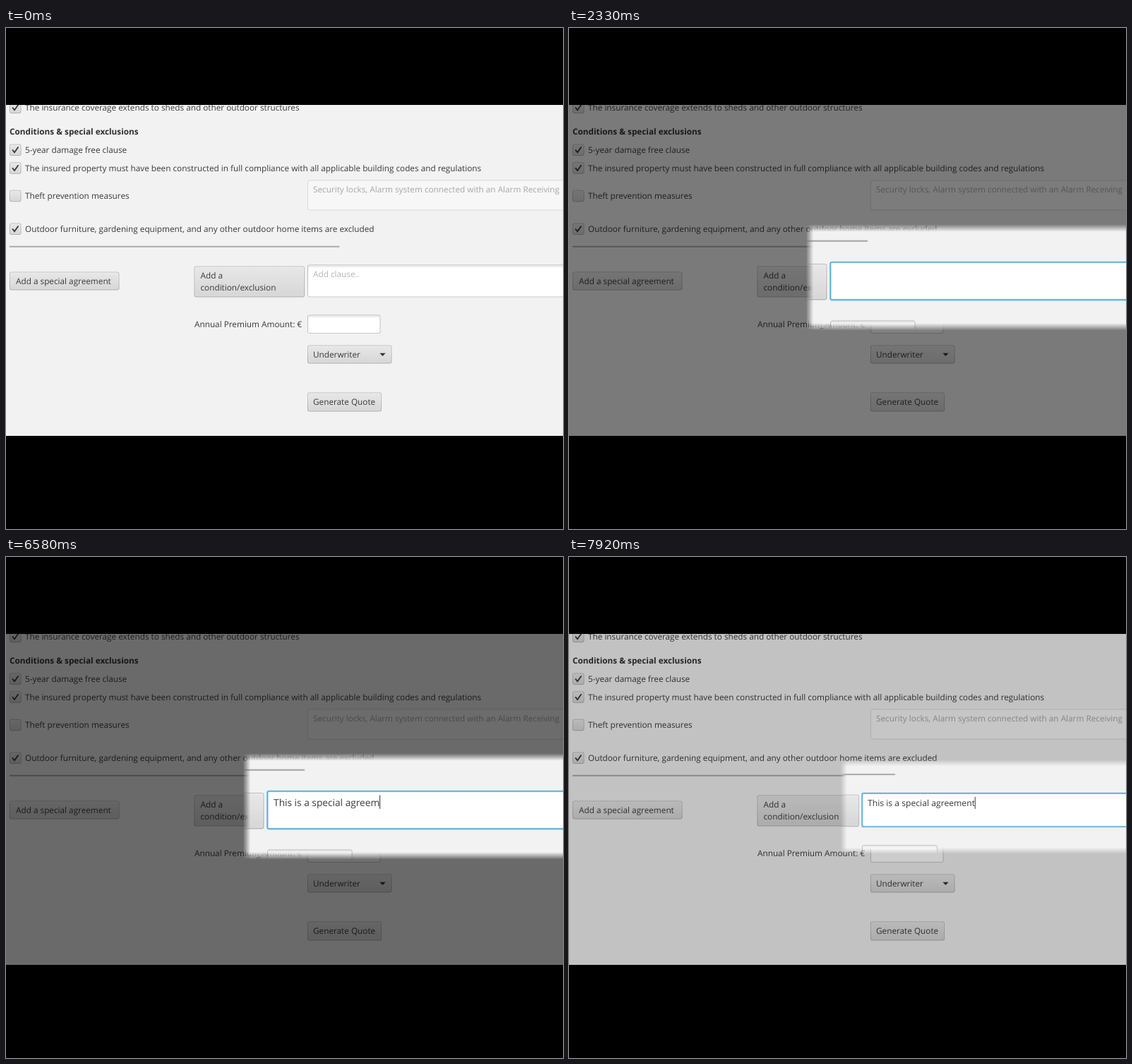
Animation, 789 px wide and 710 px high, one loop 8000 ms. Source, as an HTML page with a canvas:

```html
<!DOCTYPE html>
<html lang="en">
<head>
<meta charset="utf-8">
<title>Insurance quote form</title>
<style>
  html, body { margin: 0; width: 100%; height: 100%; overflow: hidden; background: #000; }
  canvas { display: block; }
</style>
</head>
<body>
<canvas id="stage" width="789" height="710"></canvas>
<script>
const W = 789, H = 710, LOOP = 8000, TICK = 1000 / 12;
const PANEL = { top: 109, bottom: 578 };
const PIVOT = { x: 772, y: 358 }, ZOOM = 0.165, DIM = 0.562;
const SPOT = { left: 402, top: 294, bottom: 414.2, feather: 4.5 };
const MESSAGE = 'This is a special agreement';
const FOCUS_TICK = 19;
// Tick at which each character of the message is typed.
const KEY_TICKS = [37, 39, 40, 42, 43, 44, 46, 47, 48, 49, 51, 60, 61, 63,
  65, 66, 68, 70, 72, 74, 76, 77, 78, 79, 80, 81, 82];

const stage = document.getElementById('stage').getContext('2d');
const layerCanvas = Object.assign(document.createElement('canvas'), { width: W, height: H });
const layer = layerCanvas.getContext('2d');

const ramp = (t, from, to) => Math.min(1, Math.max(0, (t - from) / (to - from)));

function gradient(c, x0, y0, x1, y1, ...stops) {
  const g = c.createLinearGradient(x0, y0, x1, y1);
  stops.forEach((color, i) => g.addColorStop(i / (stops.length - 1), color));
  return g;
}

function box(c, x, y, w, h, radius, fill) {
  c.fillStyle = fill;
  c.beginPath();
  c.roundRect(x, y, w, h, radius);
  c.fill();
}

// Text is placed by its left edge and the middle of its capitals.
function label(c, text, x, middle, color = '#3a3a3a', weight = 400) {
  c.font = `${weight} 11.78px "Open Sans", "Noto Sans", sans-serif`;
  c.textRendering = 'geometricPrecision';
  c.fillStyle = color;
  c.fillText(text, x, middle + 4.2);
}

function raised(c, x, y, w, h) {
  box(c, x, y, w, h, 3, gradient(c, 0, y, 0, y + h, '#c0c0c0', '#acacac'));
  box(c, x + 1, y + 1, w - 2, h - 2, 2, gradient(c, 0, y, 0, y + h, '#f2f2f2', '#dcdcdc'));
  box(c, x + 2, y + 2, w - 4, h - 4, 1, gradient(c, 0, y, 0, y + h, '#e8e8e8', '#d6d6d6'));
}

function button(c, x, y, w, h, pad, ...lines) {
  raised(c, x, y, w, h);
  const middle = y + h / 2 - (lines.length - 1) * 8.5;
  lines.forEach((line, i) => label(c, line, x + pad, middle + i * 17));
}

function field(c, x, y, w, h) {
  box(c, x, y, w, h, 3, gradient(c, 0, y, 0, y + h, '#b8b8b8', '#cacaca'));
  box(c, x + 1, y + 1, w - 2, h - 2, 2, '#fff');
  c.fillStyle = gradient(c, 0, y + 1, 0, y + 5, '#e4e4e4', '#fff');
  c.fillRect(x + 1, y + 1, w - 2, 4);
}

function checkRow(c, middle, text, checked = true) {
  const y = middle - 8;
  raised(c, 5, y, 16.5, 16.5);
  if (checked) {
    c.strokeStyle = '#333';
    c.lineWidth = 1.7;
    c.beginPath();
    c.moveTo(9, middle);
    c.lineTo(12, middle + 3.8);
    c.lineTo(17.5, middle - 4);
    c.stroke();
  }
  label(c, text, 27, middle + 0.3);
}

function clauseArea(c, focus) {
  if (!focus) {
    field(c, 427, 335.5, 500, 46);
    label(c, 'Add clause..', 435, 349, '#b4b4b4');
    return;
  }
  const x = 426.4, y = 334.8, w = 500, h = 47.4;
  box(c, x - 0.5, y - 0.5, w, h + 1, 3, '#c4e2ef');
  box(c, x, y, w, h, 3, '#5bb3d9');
  box(c, x + 1.6, y + 1.6, w, h - 3.2, 1, '#d3ecf7');
  box(c, x + 2.2, y + 2.2, w, h - 4.4, 1, '#fff');
  label(c, focus.text, 434.7, 349.2);
  if (focus.caret) {
    c.fillStyle = '#444';
    c.fillRect(434.5 + c.measureText(focus.text).width, 340.5, 1, 16.5);
  }
}

function drawForm(c, focus) {
  c.fillStyle = '#f2f2f2';
  c.fillRect(0, PANEL.top, 1000, PANEL.bottom - PANEL.top);

  checkRow(c, 112.5, 'The insurance coverage extends to sheds and other outdoor structures');
  label(c, 'Conditions & special exclusions', 5, 146.5, '#303030', 700);
  checkRow(c, 172.5, '5-year damage free clause');
  checkRow(c, 198.3, 'The insured property must have been constructed in full compliance with all applicable building codes and regulations');
  checkRow(c, 237.8, 'Theft prevention measures', false);
  checkRow(c, 284.5, 'Outdoor furniture, gardening equipment, and any other outdoor home items are excluded');

  box(c, 427, 215.5, 500, 43, 3, '#d9d9d9');
  box(c, 428, 216.5, 500, 41, 2, '#f7f7f7');
  label(c, 'Security locks, Alarm system connected with an Alarm Receiving', 435, 229, '#a6a6a6');

  c.fillStyle = '#acacac';
  c.fillRect(5, 308.8, 467.5, 2);

  button(c, 5, 345.5, 155.5, 26, 9, 'Add a special agreement');
  button(c, 266.5, 337.5, 156.5, 44, 9, 'Add a', 'condition/exclusion');
  clauseArea(c, focus);

  label(c, 'Annual Premium Amount: €', 267, 420);
  field(c, 427, 406.5, 103.5, 26.5);
  button(c, 427, 449.5, 119.5, 26, 8, 'Underwriter');
  c.fillStyle = '#333';
  c.beginPath();
  c.moveTo(529.3, 460.8);
  c.lineTo(537.7, 460.8);
  c.lineTo(533.5, 465);
  c.fill();
  button(c, 427, 516.5, 105, 27, 8, 'Generate Quote');
}

function maskWith(c, fill) {
  c.fillStyle = fill;
  c.fillRect(-500, -500, 2000, 2000);
}

// Enlarged copy of the form, kept only inside a soft-edged rectangle.
function drawSpotlight(scale, focus) {
  const { left, top, bottom, feather: f } = SPOT;
  layer.setTransform(1, 0, 0, 1, 0, 0);
  layer.clearRect(0, 0, W, H);
  layer.setTransform(scale, 0, 0, scale, PIVOT.x * (1 - scale), PIVOT.y * (1 - scale));
  drawForm(layer, focus);
  layer.globalCompositeOperation = 'destination-in';
  maskWith(layer, gradient(layer, left - f, 0, left + f, 0, 'transparent', '#000'));
  maskWith(layer, gradient(layer, 0, top - f, 0, top + f, 'transparent', '#000'));
  maskWith(layer, gradient(layer, 0, bottom + f, 0, bottom - f, 'transparent', '#000'));
  layer.globalCompositeOperation = 'source-over';
  stage.drawImage(layerCanvas, 0, 0);
}

function render(ms) {
  const tick = Math.floor((ms % LOOP) / TICK + 0.1);
  const zoom = ramp(tick, 18.6, 28) - ramp(tick, 83, 98.2);
  const dim = ramp(tick, 19.65, 29.1) - ramp(tick, 88.85, 98.4);

  stage.fillStyle = '#000';
  stage.fillRect(0, 0, W, H);
  stage.save();
  stage.beginPath();
  stage.rect(0, PANEL.top, W, PANEL.bottom - PANEL.top);
  stage.clip();
  drawForm(stage, null);
  stage.fillStyle = `rgba(0, 0, 0, ${DIM * dim})`;
  stage.fillRect(0, 0, W, H);

  if (tick >= FOCUS_TICK) {
    const typed = KEY_TICKS.filter(k => k <= tick).length;
    const lastKey = typed ? KEY_TICKS[typed - 1] : FOCUS_TICK;
    const caret = Math.floor((tick - lastKey) / 6) % 2 === 0;
    drawSpotlight(1 + ZOOM * zoom, { text: MESSAGE.slice(0, typed), caret });
  }
  stage.restore();
}

const start = performance.now();
function loop() {
  render(performance.now() - start);
  requestAnimationFrame(loop);
}
loop();
</script>
</body>
</html>
```
